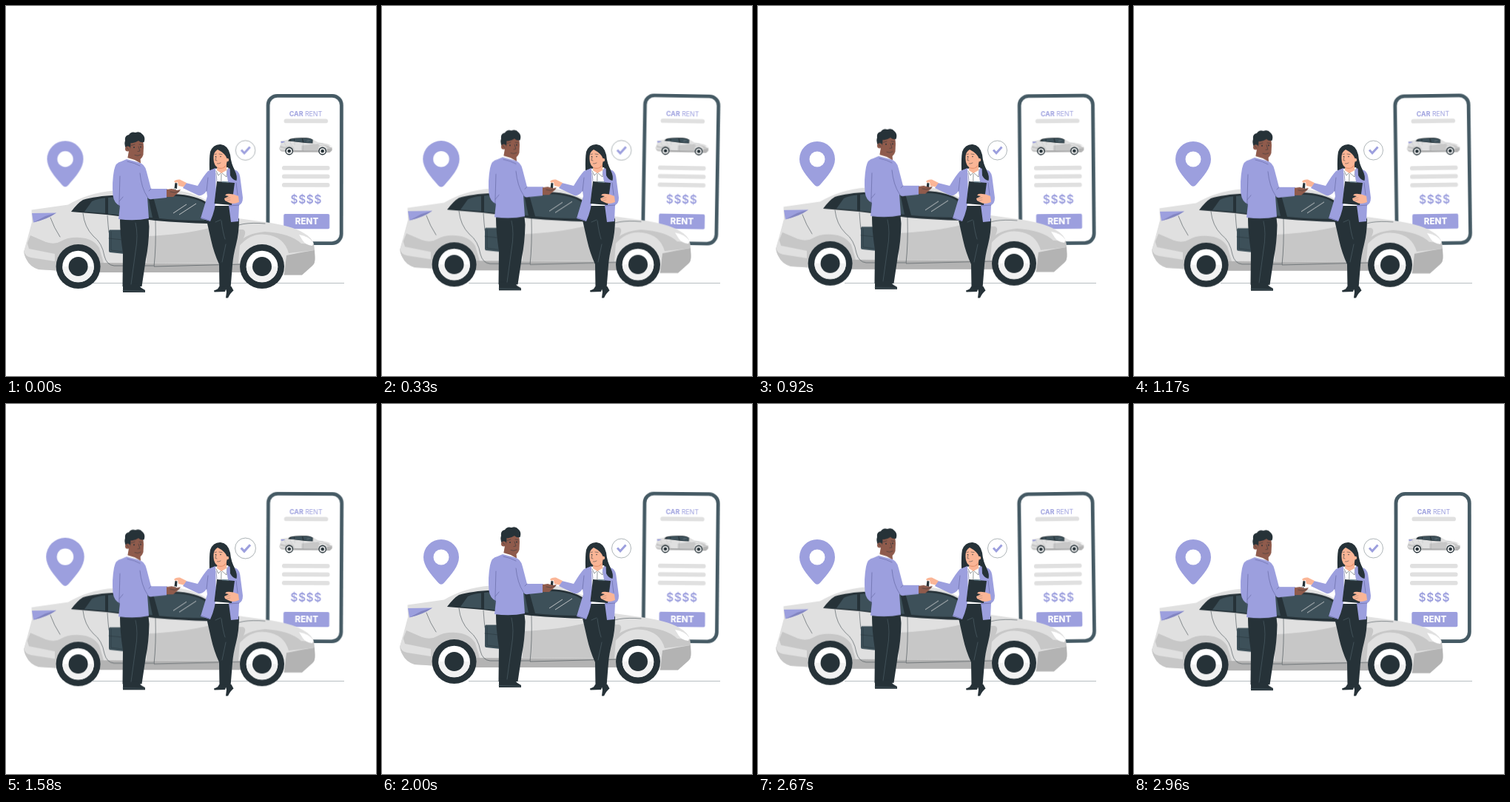
Recreate the animation shown at these times as an HTML page. Size 500 by 500 pixels, loop 3000 ms.

```html
<!DOCTYPE html>
<html lang="en">
<head>
<meta charset="utf-8">
<title>Car rent</title>
<style>
  html, body { margin: 0; width: 100%; height: 100%; overflow: hidden; background: #fff; }
  svg { display: block; width: 100%; height: 100%; }
  text { font-family: Inter, "Open Sans", sans-serif; text-anchor: middle; }
  .ink { fill: #263238; }
  .pane { fill: #3d5059; }
  .main { fill: #9c9fde; }
  .dim { fill: #8184c0; }
  .body { fill: #e0e0e0; }
  .mid { fill: #c7c7c7; }
  .low { fill: #b3b3b3; }
  .white { fill: #fff; }
  .dark { fill: #8f5b4c; }
  .fair { fill: #fab596; }
  .line { fill: none; stroke: #263238; stroke-width: .5; stroke-linecap: round; stroke-linejoin: round; }
  .fold { fill: none; stroke: #5f629c; stroke-width: .6; stroke-linecap: round; }
  .seam { fill: none; stroke: #52656e; stroke-width: .6; stroke-linecap: round; }
  #pin { transform-origin: 80px 213.5px; }
  #check { transform-origin: 323.5px 195px; }
  #phone { transform-origin: 403.6px 221px; }
</style>
</head>
<body>
<svg viewBox="0 0 500 500">
  <defs>
    <g id="wheel">
      <circle r="30" class="ink"/>
      <circle r="21.300" class="white"/>
      <path d="M-21.300 0A21.300 21.300 0 0 0 21.300 0Z" fill="#f2f2f2"/>
      <circle r="13" class="ink"/>
    </g>
    <g id="car">
      <path class="body" d="M34.500 275.500L84 268.500C102 258 120 252 146 249.500Q188 246 228 249C250 251 264 258 284 270L314 287L350 292Q386 297 401 306Q414 313 416 322L417.500 339Q418 348 414 351L400 363.500H376L318 360H128L68 357.500L44 356Q32 352 28 343Q24 336 24.500 331L35 292Z"/>
      <path class="mid" d="M33 310L54 319Q66 323 74 318Q84 312 100 313Q118 314 126 327L132 347L128 352L68 357.500L44 356Q32 352 28 343Q24 336 24.500 331Z"/>
      <path class="body" d="M24.500 331Q25 338 34 340L66 345V335L31 328L28 318Z"/>
      <path class="mid" d="M190 311Q240 309 275 300Q300 302 320 302Q328 304 316 322L314 348L190 347Z"/>
      <path class="mid" d="M314 326Q330 306 352 309Q376 312 382 334L417 330L416 322L399 321Q384 307 350 305Q325 307 314 320Z"/>
      <path class="low" d="M379 337Q397 333 417 330L417.500 339Q418 348 414 351L400 363.500H376Z"/>
      <path class="low" d="M124 347L318 348.500V360H126Z"/>
      <path class="white" d="M396 309Q409 311 415.500 320L414 324Q405 323 401 317Z"/>
      <path class="main" d="M35 280L68 279.500Q56 288 37 292.500Z"/>
      <path class="dim" d="M53 284L68 279.500Q56 288 37 292.500Z"/>
      <path class="ink" d="M88 278Q97 266 104 262Q120 257 150 255.500Q190 252.500 226 254C248 255 262 259 274 267L273 294Q239 293 202 290L136 282Z"/>
      <path class="pane" d="M106 278L116 264Q124 260 134 259.500V280ZM138 259Q168 256 192 257L198 286L138 281Z"/>
      <path class="pane" d="M199 258Q228 255 247 259Q262 262 270 268L268 290Q233 290 207 287Z"/>
      <path d="M226 280L244 268M234 282L257 267" fill="none" stroke="#e0e0e0" stroke-width=".8"/>
      <path class="line" d="M104 280Q106 299 118 311Q130 320 133 338Q136 350 146 351H199M137 283Q138 297 139 306M202 290Q203 325 200 352L316 349M60 286Q65 300 73 312M303 302Q315 291 350 294"/>
      <use href="#wheel" x="97.600" y="352"/>
      <use href="#wheel" x="346" y="352"/>
    </g>
  </defs>

  <path d="M117 374.500H457" stroke="#9aa2a6" stroke-width=".7"/>

  <g id="phone">
    <rect x="354" y="121.400" width="99.300" height="199.200" rx="12.500" fill="#fff" stroke="#455a64" stroke-width="4.800"/>
    <text x="405" y="148.600" font-size="8.800" class="main"><tspan font-weight="700">CAR</tspan> RENT</text>
    <g class="body">
      <rect x="375.500" y="152.500" width="59.500" height="5.800" rx="2.900"/>
      <rect x="373" y="216" width="64.500" height="5.800" rx="2.500"/>
      <rect x="373" y="227.500" width="64.500" height="5.800" rx="2.500"/>
      <rect x="373" y="239" width="64.500" height="5.800" rx="2.500"/>
    </g>
    <use href="#car" transform="translate(365 132.300) scale(.181)"/>
    <text x="405.800" y="266.800" font-size="15.300" font-weight="600" letter-spacing=".7" class="main">$$$$</text>
    <rect x="375.300" y="281" width="62" height="20.300" rx="2" class="main"/>
    <text x="406.600" y="295.200" font-size="11.600" font-weight="800" class="white">RENT</text>
  </g>

  <g id="pin">
    <path class="main" d="M80 183A24 24 0 0 1 104 207C104 219 94 230 84 241.500Q80 246 76 241.500C66 230 56 219 56 207A24 24 0 0 1 80 183Z"/>
    <circle cx="80" cy="207" r="10.500" class="white"/>
  </g>

  <g id="ride"><use href="#car"/></g>

  <g id="check">
    <circle cx="323.500" cy="195" r="13" fill="#fff" stroke="#37474f" stroke-width=".4"/>
    <path d="M318 194.500L322 198.800L329.500 190.500" fill="none" stroke="#9c9fde" stroke-width="2.900"/>
  </g>

  <g id="woman">
    <path class="ink" d="M275 222Q274.500 205 276 197Q280 186.500 290 187Q300 188 303 201Q304 213 310 224Q314 233 311 237L300 232L283 222Z"/>
    <path class="ink" d="M270 285L280 266H303L315 288Q315 306 311 322Q307 337 306 350L303.500 381H288.500L288 349Q281 334 277 316Z"/>
    <path class="ink" d="M288 379L298 380L296 386L281.500 386.500L281 384.500Q287 383 288 379ZM296 378L304.500 379L307.500 384.500Q303 388 300 394.500L297 394.500L298 386Z"/>
    <path class="seam" d="M291 290Q293 306 296 315M297 322L292 346M283 292L290 289"/>
    <path class="white" d="M281 220L300 218L307 235L303 270H280Z"/>
    <path class="line" d="M284 223L287 229L291 225L298 231L299 221M291 227L290 267"/>
    <path class="fair" d="M286 212L298 207V222L291 226L285 222Z"/>
    <path fill="#e3936f" d="M286 216Q294 218 298 211V216Q292 222 286 219Z"/>
    <path class="fair" d="M280.500 203Q281 197 286 194Q296 199 298.500 206Q300 215 293 218.500Q286 220 282.500 215Q280 210 280.500 203Z"/>
    <circle cx="299" cy="208" r="2.200" class="fair"/>
    <path class="line" d="M282 200.500L284.500 200M288 200L292 200.500M284 204L283 208.500L285 209M285.500 213Q288 213.500 290 212"/>
    <circle cx="283.500" cy="203.500" r=".7" class="ink"/><circle cx="290" cy="203.500" r=".7" class="ink"/>
    <path class="main" d="M283 219L273 223Q268 228 259 243L243 239L239 246L260 256Q266 257 271 250L272 257L263 287L276 291Q283 276 284 258Z"/>
    <path class="main" d="M300 219L311 222Q316 224 317 236L320 259Q320 267 315 269L314 291L304 292L301 269Q302 246 298 225Z"/>
    <path class="ink" d="M302 205Q304 214 309 222Q313 230 311.500 236Q306 235 303 229Z"/>
    <path class="fold" d="M273 232L271 250M284 226L285 237M311 239L313 255M302 270L315 269M263 286L275 290"/>
    <path class="ink" d="M285 237L309 239L305 269L281.500 267Z"/>
    <path d="M292 237.500L301 238" stroke="#78909c" stroke-width="1.500"/>
    <path class="fair" d="M314 257Q306 253 298 254L296 256L301 257L295 260L296 263L300 265Q306 269 315 265Z"/>
    <path class="line" d="M297 260L303 259M298 263L303 262" stroke-opacity=".4"/>
    <path class="ink" d="M228.500 239L231.500 239.500L231 247L227.500 246Z"/>
    <circle cx="227.500" cy="248.500" r="1.600" class="line"/>
    <path class="fair" d="M244 239L235 234.500Q229 234 227 237L229 239L232 238L233 243L240 244.500Z"/>
  </g>

  <g id="man">
    <path class="pane" d="M140 302.500H160V335L141 333Q139 333 139 331V304Z"/>
    <path class="line" d="M142 305V330L157 332M139 314L158 316"/>
    <path class="ink" d="M156 283H192L193.500 298Q193 323 189 342L183.500 379H157.500L158 334Q154 307 154 289Z"/>
    <path class="ink" d="M158 375L178 376Q182 381 188 384V387H158Z"/>
    <path class="seam" d="M175 293Q179 309 175 332L169 376M158 384.500L176 385L187 385.500"/>
    <path class="dark" d="M166 196L181 200L182 212L170 213L164 207Z"/>
    <path class="white" d="M164 205L174 208L181 212L182 216L163 209Z"/>
    <path class="dark" d="M165 185Q169 178 180 178Q186 181 186 190L185.500 201Q183 209 176 208Q168 205 166 197Z"/>
    <path class="ink" d="M163 194Q159 188 161 182Q160 175 166 174Q169 169 175 171Q181 169 184 173Q189 177 186.500 184Q182 185 179 182Q173 186 168.500 185L168 194Z"/>
    <circle cx="164.500" cy="193" r="3.500" class="dark"/>
    <path class="line" d="M169 188.500L174 187M180 187L184 187.500M179 190L181 196L178 196.500M174 201.500Q178 203.500 182 201M163 191L165.500 194"/>
    <circle cx="173" cy="191" r=".9" class="ink"/><circle cx="182" cy="190.500" r=".9" class="ink"/>
    <path class="main" d="M163 207L178 211Q188 213 190 224L196 247L218 247L217 259L197 261Q193 262 191 258L193 287Q174 291 152 288L154 270Q146 267 144.500 256Q143 238 146 222Q148 211 156 210Z"/>
    <path class="fold" d="M154 230L153 264V272M181 226Q183 246 191 258M164 210Q174 212 181 216M196 247L193 250M153 264L158 258"/>
    <path class="dark" d="M217 248L224 247L231 249L236 248L234 251L226 258L217 258Z"/>
    <path class="line" d="M222 251L228 252L234 250"/>
  </g>
</svg>
<script>
  const steps = {
    float: [[0, "translateY(.2px)"], [.5, "translateY(-5.8px)"], [1, "translateY(.2px)"]],
    beat: [[0, 1], [.1, 1.1], [.3, 1], [.4, 1], [.5, 1.1], [.6, 1], [1, 1]]
      .map(([at, s]) => [at, `scale(${s})`]),
    sway: [[0, 0], [.25, 1], [.75, -1], [1, 0]]
      .map(([at, a]) => [at, `rotate(${a}deg)`])
  };
  const parts = { ride: "float", man: "float", pin: "beat", check: "beat", phone: "sway" };

  for (const [id, move] of Object.entries(parts)) {
    document.getElementById(id).animate(
      steps[move].map(([offset, transform]) => ({ offset, transform })),
      { duration: 1500, delay: -30, iterations: Infinity, easing: "linear" }
    );
  }
</script>
</body>
</html>
```
